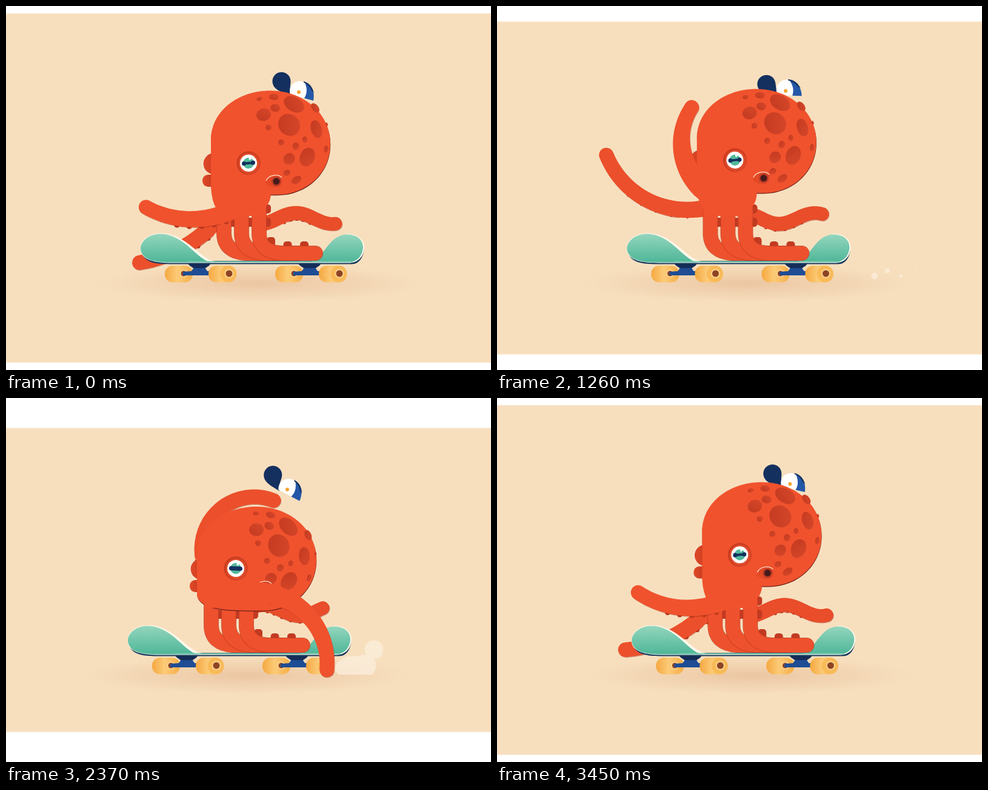
Recreate the animation shown at these times as an HTML page. Size 800x600 px, loop 3.48 s.

```html
<!DOCTYPE html>
<html lang="en">
<head>
<meta charset="utf-8">
<title>Skating octopus</title>
<style>
html,body{margin:0;width:100%;height:100%;overflow:hidden;background:#fff}
svg{display:block;width:800px;height:600px}
</style>
</head>
<body>
<svg viewBox="0 0 800 600">
  <defs>
    <radialGradient id="floor">
      <stop offset="0" stop-color="#e3b48e" stop-opacity=".6"/>
      <stop offset=".6" stop-color="#e9c19d" stop-opacity=".3"/>
      <stop offset="1" stop-color="#f0cfab" stop-opacity="0"/>
    </radialGradient>
    <linearGradient id="mint" x2="0" y2="1"><stop offset="0" stop-color="#93d6bd"/><stop offset="1" stop-color="#4fb698"/></linearGradient>
    <linearGradient id="tyre"><stop offset="0" stop-color="#f5a840"/><stop offset=".45" stop-color="#fccb78"/><stop offset="1" stop-color="#f6ad47"/></linearGradient>
    <linearGradient id="spot" x2="1" y2="1"><stop offset="0" stop-color="#c23a20"/><stop offset="1" stop-color="#d7472a"/></linearGradient>
    <linearGradient id="side"><stop offset="0" stop-color="#e14a28"/><stop offset="1" stop-color="#b73319"/></linearGradient>
    <clipPath id="ground"><rect width="800" height="456"/></clipPath>
    <g id="wheel"><rect y="428" width="46" height="27.5" rx="13" fill="url(#tyre)"/></g>
    <g id="truck">
      <use href="#wheel" x="262"/>
      <circle cx="293" cy="441" r="6.5" fill="#fbd591"/>
      <circle cx="293" cy="441" r="4.5" fill="#8e4424"/>
      <path d="M292 438L306 437 310 431H328L332 437H340V444H292Z" fill="#1e4d94"/>
      <path d="M299 424H338L335 428 329 432H309L303 428Z" fill="#152d58"/>
      <use href="#wheel" x="334"/>
      <circle cx="367" cy="441.500" r="13.500" fill="#f9ba58"/>
      <circle cx="368" cy="441" r="7.500" fill="#fbd591"/>
      <circle cx="368" cy="441" r="5.500" fill="#8e4424"/>
    </g>
  </defs>
  <rect id="band" width="800" fill="#f7dfbe"/>
  <ellipse id="shade" cy="457" rx="290" ry="34" fill="url(#floor)"/>
  <g id="back"></g>
  <g id="curl"></g>
  <g id="hat">
    <path d="M-13 5C-20 2 -40 -1 -43 -14A14.500 14.500 0 0 1 -14 -22C-12 -14 -17 -6 -12 5Z" fill="#14305f"/>
    <path d="M-14 4C-18 -8 -9 -18 2 -18C16 -18 25 -6 24 10L22 13Z" fill="#fff"/>
    <path d="M10 -16C21 -14 27 0 24 14L9 10C14 2 14 -6 10 -16Z" fill="#2457a6"/>
    <path d="M8 -18Q21 -14 25 1L21 -3Q17 -12 8 -16Z" fill="#14305f"/>
    <circle r="3" fill="#f6a32f"/>
  </g>
  <g id="ears">
    <circle cx="342" cy="260" r="17.500" fill="#fff" opacity=".75"/>
    <circle cx="343" cy="260" r="17.500" fill="url(#side)"/>
    <rect x="324" y="278" width="26" height="20" rx="9.500" fill="url(#side)"/>
  </g>
  <g id="puffs" clip-path="url(#ground)" fill="#fcf0df" opacity=".72"></g>
  <g id="board">
    <use href="#truck"/>
    <use href="#truck" x="182"/>
    <path d="M226 412C234 424 250 425.500 275 425.500H570C584 425.500 590 412 590.500 400L560 420H300Z" fill="#153a5e"/>
    <path d="M345 421C320 418 298 374.500 255 374.500C235 375 221.500 386 221.500 400C222 417 240 423.500 275 423.500H568C583 422 590.500 411 591 398C591 385 580 375.500 562 375.500L510 421Z" fill="#fff8ec"/>
    <path d="M338 422.500C314 418 295 376 254 375.500C236 376 222 387 222 400C223 416 240 422.500 270 422.500Z" fill="url(#mint)"/>
    <path d="M500 422C525 419 530 377 563 376.500C580 377 589 386 589 398C588 411 580 422 566 422Z" fill="url(#mint)"/>
    <path d="M300 421.500H572" stroke="#75c8ac" stroke-width="2"/>
    <g id="legs" fill="none" stroke-linecap="round"></g>
  </g>
  <path id="rim" fill="#6d1f18"/>
  <path id="neck" fill="#f0522d"/>
  <path id="head" fill="#f0522d"/>
  <g id="spots" fill="url(#spot)"></g>
  <g id="siphon">
    <path d="M-18 4C-17 -11 4 -15 10 -5L4 9Q-8 12 -18 4Z" fill="#d3411f" opacity=".45"/>
    <path d="M-17 -1C-12 -12 4 -12 9 -6" fill="none" stroke="#ffe6d3" stroke-width="1.200"/>
    <circle r="9.300" fill="#d5452a"/>
    <circle r="7" fill="#aa3422"/>
    <circle r="5.300" fill="#451b1c"/>
  </g>
  <g id="eye">
    <circle r="19.500" fill="#c83c20"/>
    <circle cx=".7" cy=".7" r="17.500" fill="#de4a29"/>
    <g id="ball">
      <circle r="14" fill="#fff"/>
      <circle r="9" fill="#51b99b"/>
      <path id="pupil" d="M-7 0H7" stroke="#14305f" stroke-width="4"/>
      <circle cx="-7.500" r="3.500" fill="#14305f"/>
      <circle cx="7.500" r="3.500" fill="#14305f"/>
      <circle cx="3" cy="-7" r="2" fill="#fff"/>
    </g>
  </g>
  <g id="front"></g>
</svg>
<script>
const LOOP = 3480, CYCLE = 1740, TAU = 2 * Math.PI;
const $ = id => document.getElementById(id);
const set = (el, attrs) => { for (const k in attrs) el.setAttribute(k, attrs[k]); return el; };
const add = (parent, tag, attrs = {}) =>
  parent.appendChild(set(document.createElementNS('http://www.w3.org/2000/svg', tag), attrs));
const move = (id, x, y, extra = '') => set($(id), { transform: `translate(${x} ${y}) ${extra}` });
const fix = n => n.toFixed(1);
const swell = (t, peak) => Math.max(0, Math.cos(TAU * (t - peak) / CYCLE));

// Periodic smooth curve through rows of [time, ...values]
function sample(rows, t) {
  const n = rows.length;
  const row = i => {
    const k = (i + n) % n;
    return { t: rows[k][0] + Math.floor(i / n) * CYCLE, v: rows[k].slice(1) };
  };
  let i = n - 1;
  while (i > 0 && rows[i][0] > t) i--;
  const [a, b, c, d] = [row(i - 1), row(i), row(i + 1), row(i + 2)];
  const h = c.t - b.t, u = (t - b.t) / h, u2 = u * u, u3 = u2 * u;
  return b.v.map((p, j) => {
    const m0 = (c.v[j] - a.v[j]) / (c.t - a.t) * h;
    const m1 = (d.v[j] - b.v[j]) / (d.t - b.t) * h;
    return (2 * u3 - 3 * u2 + 1) * p + (u3 - 2 * u2 + u) * m0 + (3 * u2 - 2 * u3) * c.v[j] + (u3 - u2) * m1;
  });
}

// time, sway of the whole, crouch of the head, drop of the face
const BODY = [
  [0, 0, 0, 0], [240, .43, .35, 7], [450, .86, .75, 16], [630, 1, 1, 22],
  [990, .82, .2, 10], [1260, .36, -.07, -5], [1500, .08, -.05, -3]
];
// time, tip x, tip y, total bend of the arc
const FRONT = [[0, 230, 331, 1.14], [240, 267, 419, 1.7], [630, 529, 449, 1.8], [990, 449, 150, 2.7], [1260, 321, 167, 2.1]];
const BACK = [
  [0, 219, 423, .83], [240, 372, 430, 1], [430, 520, 424, 1.7],
  [630, 442, 169, 3.05], [990, 252, 160, 2.57], [1260, 180, 245, 1.58]
];

const STEPS = 28;
// Circular arc from base to tip as [x, y, heading] at u
function arc(x, y, [tx, ty, bend]) {
  const chord = Math.hypot(tx - x, ty - y), dir = Math.atan2(ty - y, tx - x);
  return u => {
    const len = chord * Math.sin(u * bend / 2) / Math.sin(bend / 2), a = dir + (u - 1) * bend / 2;
    return [x + len * Math.cos(a), y + len * Math.sin(a), a + u * bend / 2];
  };
}

// Ripple running out along a level limb
function ripple(x, t) {
  const at = u => [x + 119 * u, 350 + 9 * Math.cos(TAU * (u + .05 - 2 * t / CYCLE))];
  return u => {
    const [px, py] = at(u), [qx, qy] = at(u + .01);
    return [px, py, Math.atan2(qy - py, qx - px)];
  };
}

function outline(pts) {
  const edge = side => pts.map(([x, y, a, w]) =>
    `${fix(x - side * Math.sin(a) * w)} ${fix(y + side * Math.cos(a) * w)}`);
  const r = fix(pts[pts.length - 1][3]), r0 = fix(pts[0][3]);
  const l = edge(-1), m = edge(1).reverse();
  return `M${l.join('L')}A${r} ${r} 0 0 1 ${m.join('L')}A${r0} ${r0} 0 0 1 ${l[0]}Z`;
}

// side tells which edge carries the suckers
function makeArm(id, side, tip, colour) {
  const g = $(id);
  const suckers = Array.from({ length: 5 }, () => add(g, 'circle', { fill: '#bd3a20' }));
  const dark = add(g, 'path', { fill: '#ac3018', opacity: .55, transform: 'translate(.8 1.2)' });
  const skin = add(g, 'path', { fill: colour });
  return (curve, base, size) => {
    const pts = Array.from({ length: STEPS + 1 }, (_, i) => {
      const u = i / STEPS;
      return [...curve(u), tip + (base - tip) * (1 - u) ** 1.5];
    });
    set(skin, { d: outline(pts) });
    set(dark, { d: outline(pts.slice(9)) });
    suckers.forEach((el, i) => {
      const [x, y, a, w] = pts[7 + i * 3], off = side * (w - 1);
      set(el, { cx: fix(x - Math.sin(a) * off), cy: fix(y + Math.cos(a) * off), r: fix(4.5 * size) });
    });
  };
}
const back = makeArm('back', -1, 12, '#ec4f2b');
const curl = makeArm('curl', 1, 11, '#e94d2a');
const front = makeArm('front', -1, 12, '#f0522d');

// Legs and their suckers, standing on the deck
const legs = $('legs');
const pad = (x, y) => add(legs, 'rect', { x: x - 7, y: y - 7, width: 14, height: 15, rx: 5, fill: '#c23a22' });
for (let i = 0; i < 3; i++) {
  pad(374 + 28 * i, 356);
  pad(437 + 27.5 * i, i ? 395 : 388);
}
pad(430, 334);
for (let i = 0; i < 3; i++) {
  const x = 359.5 + 29 * i, d = `M${x} 335V376Q${x + 1} 405 ${x + 36} 407.5H${x + 93}`;
  add(legs, 'path', { d, stroke: '#c23c20', 'stroke-width': 25, opacity: .8 });
  add(legs, 'path', { d, stroke: '#ee512d', 'stroke-width': 23 });
}

// Round spots, foreshortened towards the rim of the skull
[
  [467, 196, 19], [475, 162, 18], [512, 203, 15], [497, 249, 16], [425, 179, 12], [444, 168, 8],
  [467, 252, 10], [479, 287, 9], [442, 150, 8], [493, 220, 5], [478, 231, 6], [528, 236, 6],
  [463, 275, 6], [433, 200, 5], [454, 225, 5], [418, 153, 5], [510, 168, 9], [529, 195, 3]
].forEach(([cx, cy, r]) => {
  const dx = cx - 437, dy = cy - 225, d = Math.hypot(dx, dy) / 98;
  const rx = r * Math.max(.6, Math.sqrt(Math.max(0, 1 - d * d)));
  add($('spots'), 'ellipse', { cx, cy, rx, ry: r, transform: `rotate(${Math.atan2(dy, dx) * 360 / TAU} ${cx} ${cy})` });
});

const SKULL = 'M338 285V222C338 172 384 139.500 436 139.500C492 139.500 535 178 535 227C535 276 495 311 447 311C400 311 342 312 338 285Z';
for (const id of ['head', 'rim']) set($(id), { d: SKULL });

// Dust thrown up by each push
const puffs = [450, 2050].flatMap(push => Array.from({ length: 5 }, (_, i) => {
  const el = add($('puffs'), 'circle');
  return t => {
    const k = (t - push - 40 * i) / 800;
    const size = Math.max(0, Math.min(k / .3, (1 - k) / .7));
    const lift = i ? 10 * (i % 2) : 75;
    set(el, { cx: fix(535 + (180 - 18 * i) * k), cy: fix(445 - lift * k), r: fix((i ? 20 : 18) * size) });
  };
}));

function draw(time) {
  const t = time % CYCLE;
  const [sway, crouch, drop] = sample(BODY, t);
  const bx = -21 * sway, top = 12.5 + 37 * sway;
  const hx = -23 * sway, hy = 39.5 * crouch;
  set($('band'), { y: top, height: 600 - 2 * top });
  set($('shade'), { cx: 418 + bx });
  move('board', bx, 0);
  move('head', hx, hy);
  move('rim', hx + .3, hy + 1.2);
  move('spots', hx, hy, `rotate(${13.5 * crouch ** 2} 437 225)`);
  move('ears', bx, drop);
  move('hat', 483 - 19 * sway, 142 + .4 * drop,
    `rotate(${13 * crouch + 12 * Math.min(0, Math.sin(TAU * t / CYCLE))})`);
  move('siphon', 446 - 17 * sway, 289 + 1.05 * drop);
  move('eye', 400 + bx, 259 + drop);
  const blink = Math.max(0, 1 - Math.abs(time - 630) / 110);
  set($('ball'), { transform: `rotate(${8 * crouch - 5}) scale(1 ${1 - .26 * blink})` });
  set($('pupil'), { 'stroke-width': 4 + 3 * crouch });
  const l = 338 + hx, r = 437 + hx;
  set($('neck'), { d: `M${l} ${270 + hy}V${298 + hy * .6}Q${l + 1} 322 ${348 + bx} 336V346H${429 + bx}V330Q${r} 322 ${r} ${308 + hy}Z` });
  back(arc(370, 325, sample(BACK, t)), 14, swell(t, 1560));
  curl(ripple(425 + bx, t), 12, .6);
  front(arc(398, 322, sample(FRONT, t)), 16 + 28 * swell(t, 990) ** 2, swell(t, 60));
  puffs.forEach(puff => puff(time));
}

const start = performance.now();
function tick() {
  const t = (performance.now() - start) % LOOP;
  draw(Math.floor(t / 30) * 30);
  requestAnimationFrame(tick);
}
tick();
</script>
</body>
</html>
```
